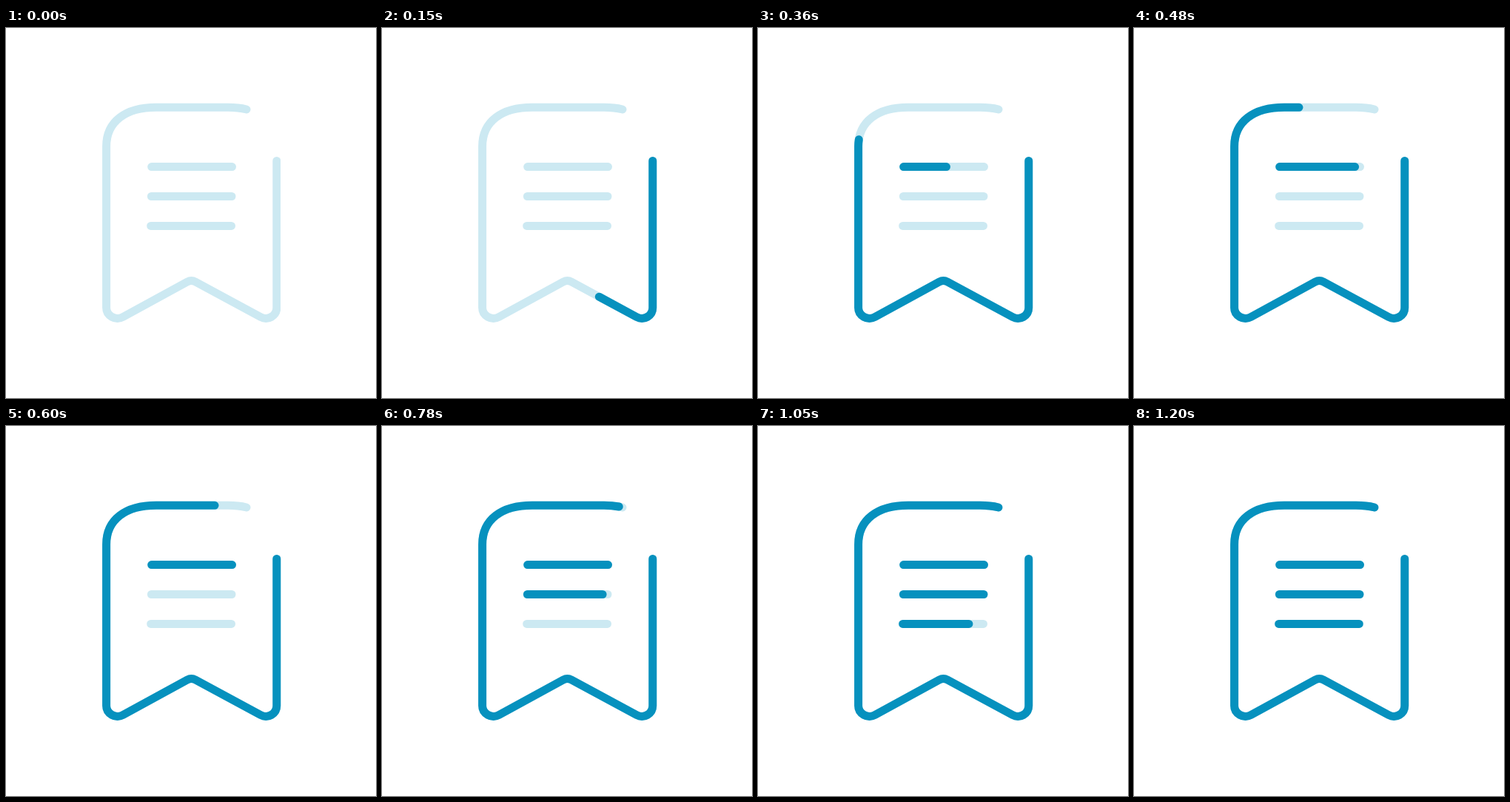
An HTML page with a canvas for the animation above (1380 ms loop, 500x500 px).

```html
<!DOCTYPE html>
<html lang="en">
<head>
<meta charset="utf-8">
<title>Bookmark loader</title>
<style>
  html, body { margin: 0; width: 100%; height: 100%; overflow: hidden; background: #fff; }
  canvas { display: block; width: 500px; height: 500px; }
</style>
</head>
<body>
<canvas id="stage" width="500" height="500"></canvas>
<script>
const ctx = document.getElementById('stage').getContext('2d');
const LOOP = 1380, STEP = 30;
const PALE = '#cce9f2', BLUE = '#0691be';

const OUTLINE = 'M365.8 179.5 V378 C365.8 389 354 395.8 344 390.5 L256 343 ' +
  'Q250.5 340 245 343 L158 390.5 C148 395.8 135.6 389 135.6 378 V160 ' +
  'C135.6 126 162 107.3 203 107.3 H300 Q314 107.3 325 110';

// Start and duration are counted in steps.
function makeStroke(d, start, duration) {
  const measure = document.createElementNS('http://www.w3.org/2000/svg', 'path');
  measure.setAttribute('d', d);
  return { path: new Path2D(d), length: measure.getTotalLength(), start, duration };
}

const strokes = [
  makeStroke(OUTLINE, 2, 28),
  makeStroke('M196.7 187.6 H305.5', 10, 10),
  makeStroke('M196.4 227.5 H305', 20, 10),
  makeStroke('M195.7 267.4 H304.5', 30.9, 10)
];

const bezier = (a, b, s) => 3 * (1 - s) ** 2 * s * a + 3 * (1 - s) * s * s * b + s ** 3;

function easeOut(u) {
  if (u <= 0) return 0;
  if (u >= 1) return 1;
  let low = 0, high = 1;
  for (let i = 0; i < 24; i++) {
    const mid = (low + high) / 2;
    if (bezier(0.22, 0.385, mid) < u) low = mid; else high = mid;
  }
  return bezier(0.7, 1, low);
}

function drawPale() {
  ctx.save();
  ctx.beginPath();
  ctx.rect(0, 0, 371, 500);
  ctx.clip();
  ctx.strokeStyle = PALE;
  ctx.setLineDash([]);
  for (const { path } of strokes) ctx.stroke(path);
  ctx.restore();
}

function drawProgress(step) {
  ctx.strokeStyle = BLUE;
  for (const { path, length, start, duration } of strokes) {
    const part = easeOut((step - start) / duration);
    if (part === 0) continue;
    ctx.setLineDash(part < 1 ? [length * part, length + 50] : []);
    ctx.stroke(path);
  }
}

function render() {
  const step = Math.floor((performance.now() % LOOP) / STEP);
  ctx.fillStyle = '#fff';
  ctx.fillRect(0, 0, 500, 500);
  ctx.lineWidth = 11;
  ctx.lineCap = 'round';
  ctx.lineJoin = 'round';
  drawPale();
  drawProgress(step);
  requestAnimationFrame(render);
}
render();
</script>
</body>
</html>
```
